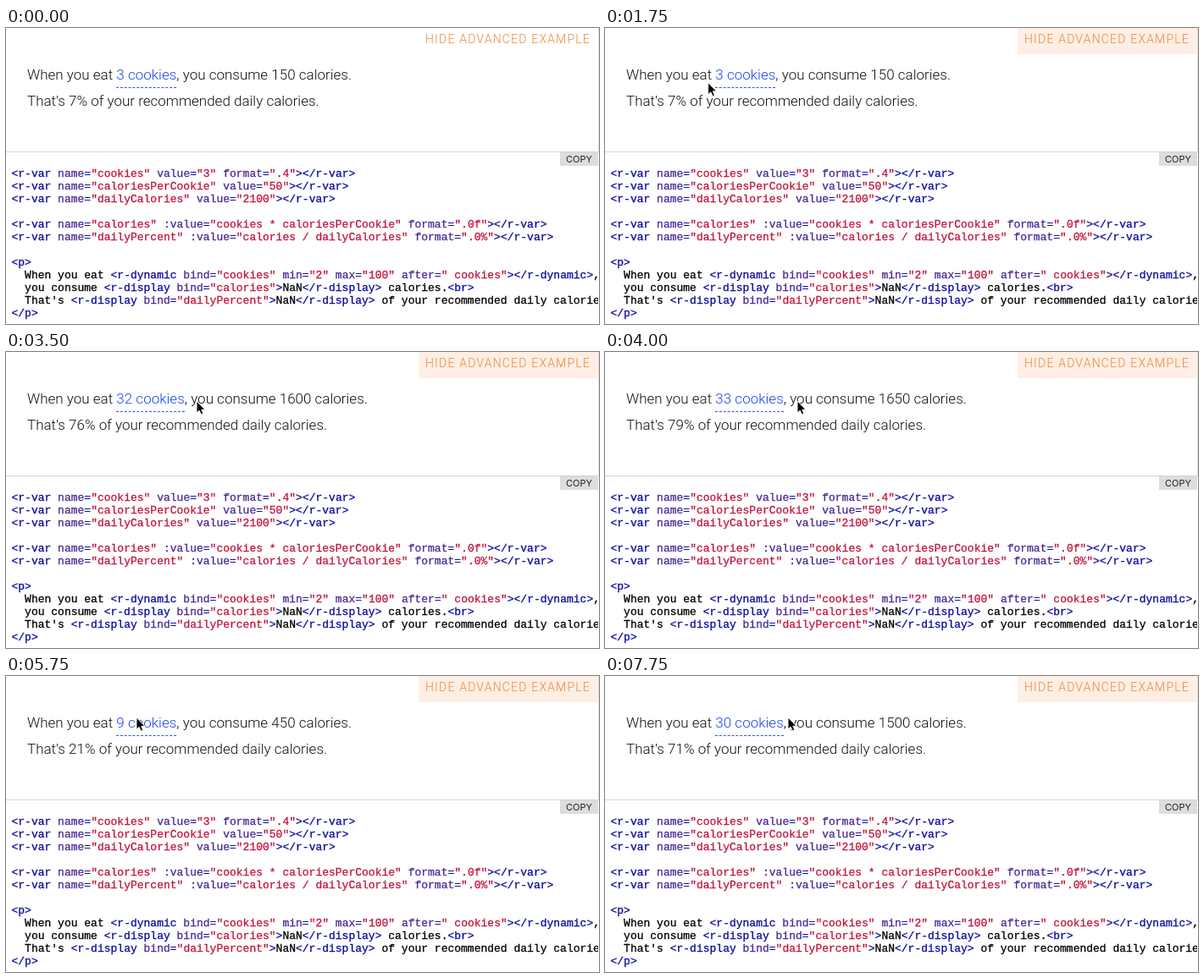
Animation of 700x350 px, one loop 8000 ms. Source, as an HTML page:

```html
<!DOCTYPE html>
<html lang="en">
<head>
<meta charset="utf-8">
<style>
  html, body { margin: 0; width: 100%; height: 100%; overflow: hidden; background: #fff; }
  #stage { position: relative; width: 700px; height: 350px; overflow: hidden; font-family: Roboto, sans-serif; }
  #stage > * { position: absolute; margin: 0; white-space: pre; }
  #toggle { left: 487px; top: 0; width: 212px; height: 31px; padding-left: 8px; box-sizing: border-box;
    border-radius: 0 0 2px 2px; font-size: 14px; font-weight: 300; line-height: 26px; letter-spacing: 1.2px; color: #e8873a; }
  #toggle.active { background: #feeee4; }
  #prose { left: 25px; top: 40px; font-size: 17px; font-weight: 300; line-height: 31px; color: #111; }
  #cookies { color: #1c46ee; padding-bottom: 5px; border-bottom: 1px dashed #2f55e6; }
  #rule { left: 0; top: 146px; width: 700px; height: 1px; background: #d4d4d4; }
  #edge { left: 699px; top: 0; width: 1px; height: 146px; background: #e2e2e2; }
  #copy { left: 654px; top: 147px; width: 45px; height: 16px; padding-left: 7px; box-sizing: border-box;
    font: 11px/17px Inter, sans-serif; color: #222; background: #ddd; }
  #code { left: 6.5px; top: 165px; width: 692.5px; overflow: hidden; color: #000;
    font: 13px/15px "Liberation Mono", monospace; -webkit-text-stroke: .3px; }
  #code .tag { color: #0a0a9a; }
  #code .attr { color: #4b2a94; }
  #code .str { color: #c0143c; }
  #cursor { left: 0; top: 0; overflow: visible; }
</style>
</head>
<body>
<div id="stage">
  <div id="edge"></div>
  <div id="toggle">HIDE ADVANCED EXAMPLE</div>
  <p id="prose">When you eat <span id="cookies"></span>, you consume <span id="calories"></span> calories.
That's <span id="percent"></span> of your recommended daily calories.</p>
  <div id="rule"></div>
  <div id="copy">COPY</div>
  <pre id="code"></pre>
  <svg id="cursor" width="14" height="20">
    <path d="M0 0V14L3.2 11.2L5.4 16L7.8 15L5.8 10.2H10Z" fill="#000" stroke="#fff" stroke-linejoin="round"/>
  </svg>
</div>
<script>
const $ = id => document.getElementById(id);
const LOOP = 8000, STEP = 250, APPEAR = 250;

const markup = `<r-var name="cookies" value="3" format=".4"></r-var>
<r-var name="caloriesPerCookie" value="50"></r-var>
<r-var name="dailyCalories" value="2100"></r-var>

<r-var name="calories" :value="cookies * caloriesPerCookie" format=".0f"></r-var>
<r-var name="dailyPercent" :value="calories / dailyCalories" format=".0%"></r-var>

<p>
  When you eat <r-dynamic bind="cookies" min="2" max="100" after=" cookies"></r-dynamic>,
  you consume <r-display bind="calories">NaN</r-display> calories.<br>
  That's <r-display bind="dailyPercent">NaN</r-display> of your recommended daily calories.
</p>`;

const paint = (kind, text) => `<span class="${kind}">${text}</span>`;
$('code').innerHTML = markup.replace(/<([^>]+)>/g, (_, body) =>
  paint('tag', '&lt;' + body.replace(/("[^"]*")|[:\w]+(?==)/g,
    (part, str) => paint(str ? 'str' : 'attr', part)) + '&gt;'));

// Each move glides the pointer, and the dragged value, to a new state; it rests in between.
const initial = { x: 640, y: 8, count: 3 };
const moves = [
  { from: 250, to: 1250, x: 71, y: 86, count: 3 },
  { from: 1250, to: 2000, x: 147, y: 54, count: 3 },
  { from: 2500, to: 3500, x: 225, y: 58, count: 32 },
  { from: 3500, to: 4000, x: 227, y: 58, count: 33 },
  { from: 4250, to: 4750, x: 219, y: 55, count: 40 },
  { from: 4750, to: 5950, x: 141, y: 48, count: 3 },
  { from: 6750, to: 7750, x: 216, y: 49, count: 30 }
];

const stateAt = t => moves.reduce((state, move) => {
  const k = Math.min(1, Math.max(0, (t - move.from) / (move.to - move.from)));
  const mix = key => state[key] + (move[key] - state[key]) * k;
  return { x: mix('x'), y: mix('y'), count: mix('count') };
}, initial);

function render(now) {
  const t = Math.floor(now % LOOP / STEP) * STEP;
  const { x, y, count } = stateAt(t);
  const cookies = Math.round(count), calories = cookies * 50;
  $('cookies').textContent = `${cookies} cookies`;
  $('calories').textContent = calories;
  $('percent').textContent = `${Math.round(calories / 2100 * 100)}%`;
  $('toggle').classList.toggle('active', t >= APPEAR);
  $('cursor').style.visibility = t >= APPEAR ? 'visible' : 'hidden';
  $('cursor').style.transform = `translate(${x}px, ${y}px)`;
}

const start = performance.now();
function tick() {
  render(performance.now() - start);
  requestAnimationFrame(tick);
}
tick();
</script>
</body>
</html>
```
